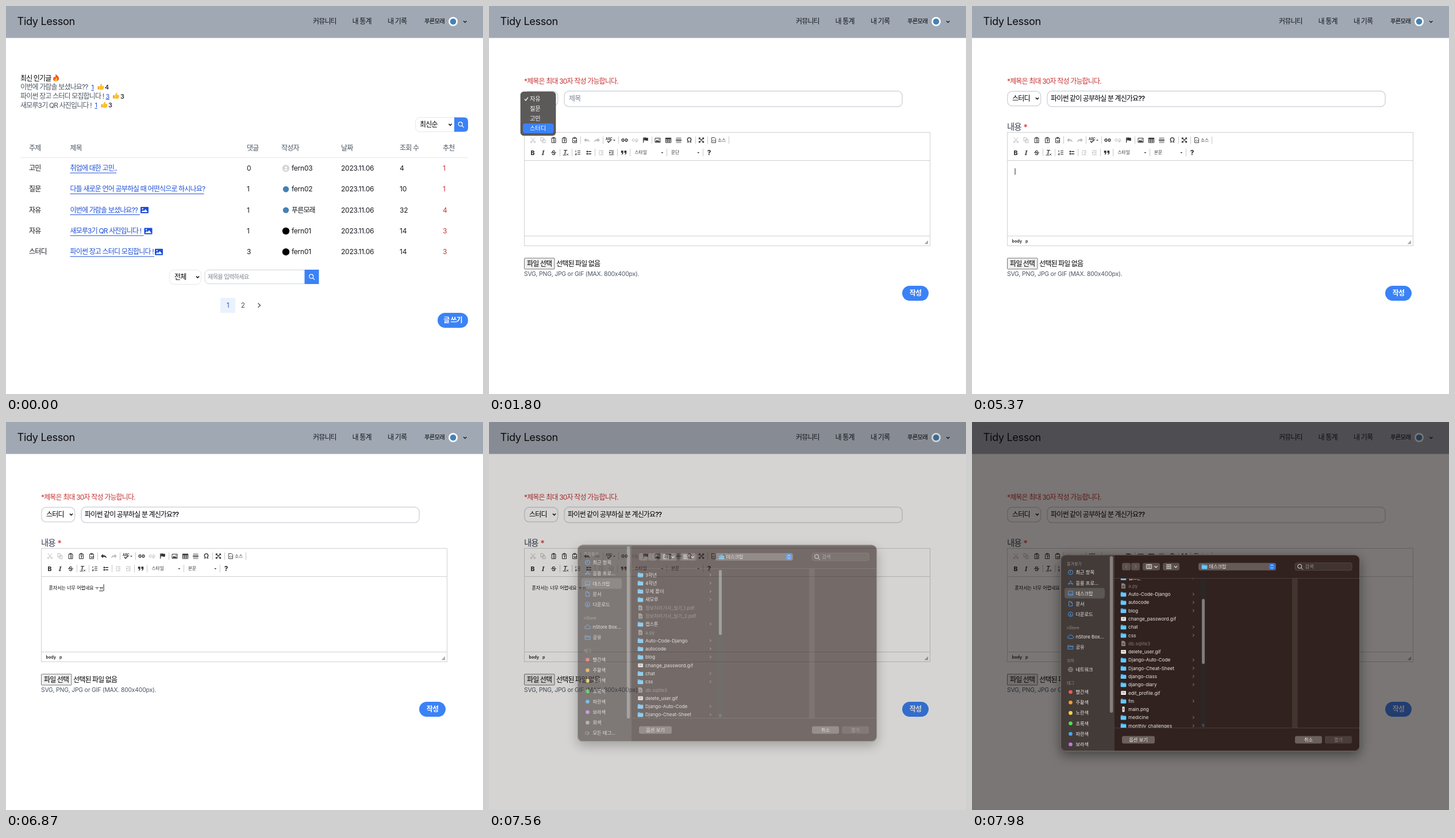
An HTML page that plays this animation: 830x674 px, repeating every 8000 ms.

```html
<!DOCTYPE html>
<html lang="ko">
<head>
<meta charset="utf-8">
<title>Study board</title>
<style>
  html, body { margin: 0; width: 100%; height: 100%; overflow: hidden; background: #fff; }
  svg { display: block; width: 830px; height: 674px; }
  text { font-family: Inter, "Noto Sans CJK KR", "Noto Sans CJK", sans-serif; letter-spacing: -.02em; }
  text.ko { letter-spacing: -.07em; }
  .sys text { letter-spacing: 0; }
  .mid { text-anchor: middle; }
  #dialog { filter: drop-shadow(0 7px 10px rgba(0, 0, 0, .42)); }
</style>
</head>
<body>
<svg id="stage" viewBox="0 0 830 674" xmlns="http://www.w3.org/2000/svg"></svg>
<script>
const BLUE = '#3b82f6', INK = '#16181d', GRAY = '#4b5563', RED = '#c53030', EDGE = '#d1d5db';
const LOOP = 8000;

// ---- drawing helpers; text y is the optical centre of the line ----
const text = (x, y, s, size = 12, fill = INK, attrs = '') =>
  `<text x="${x}" y="${y + size * .37}" font-size="${size}" fill="${fill}" ` +
  `${/class=/.test(attrs) ? '' : /[가-힣]/.test(s) ? 'class="ko"' : ''} ${attrs}>${s}</text>`;
const rect = (x, y, w, h, fill, r = 0, attrs = '') =>
  `<rect x="${x}" y="${y}" width="${w}" height="${h}" rx="${r}" fill="${fill}" ${attrs}/>`;
const box = (x, y, w, h, r, stroke = EDGE, attrs = '') =>
  rect(x, y, w, h, '#fff', r, `stroke="${stroke}" ${attrs}`);
const dot = (x, y, r, fill) => `<circle cx="${x}" cy="${y}" r="${r}" fill="${fill}"/>`;
const line = (x1, y1, x2, y2, color, w = 1) =>
  `<path d="M${x1} ${y1}L${x2} ${y2}" stroke="${color}" stroke-width="${w}"/>`;
const icon = (x, y, d, color = '#333', w = 1, attrs = '') =>
  `<path transform="translate(${x} ${y})" d="${d}" fill="none" stroke="${color}" stroke-width="${w}" ${attrs}/>`;
const solid = (x, y, d, color = '#333', attrs = '') =>
  `<path transform="translate(${x} ${y})" d="${d}" fill="${color}" fill-rule="evenodd" ${attrs}/>`;
const group = (id, body, attrs = '') => `<g id="${id}" ${attrs}>${body}</g>`;
const clip = (id, x, y, w, h, r = 0) => `<clipPath id="${id}">${rect(x, y, w, h, '#000', r)}</clipPath>`;

const down = (x, y, color = '#111', w = 1.5) => icon(x, y, 'M-2.6-1.2L0 1.4L2.6-1.2', color, w);
const right = (x, y, color, k = 1, w = 1) => icon(x, y, `M${-k}${-2 * k}L${k} 0L${-k} ${2 * k}`, color, w);
const lens = (x, y, color = '#fff', w = 1.2) =>
  icon(x, y, 'M2.7-.8a3.5 3.5 0 1 0-7 0a3.5 3.5 0 1 0 7 0M1.7 1.7L5 5', color, w);
const picture = (x, y, color) => solid(x, y,
  'M-7-4.5q0-1 1-1h12q1 0 1 1v9q0 1-1 1h-12q-1 0-1-1zM-5.5 3.5h11l-3.8-5l-2.7 3.2l-1.7-1.5zM-4.5-2.3a1.2 1.2 0 1 0 2.4 0a1.2 1.2 0 1 0-2.4 0z', color);
const thumb = (x, y) =>
  solid(x, y, 'M-2-1L.6-5.5q1.8 0 1.5 1.8L1.6-1.6H4.5q1.4.4 1 1.8L4.5 4q-.5 1-1.6 1H-2z', '#fbc02d') +
  solid(x, y, 'M-5.5-1h3v5.5h-3z', '#f5a623');
const flame = (x, y) =>
  solid(x, y, 'M-1-6.5C4-3.5 5.5-1 5 2.2C4.4 5-1 7-3.6 4.7C-6.2 2-4-.6-3.4-2.4L-2-.6C-.6-2.5-.4-4.5-1-6.5z', '#f4511e') +
  solid(x, y, 'M.5-1.5C3 1 3 5.5 0 5.8C-3 5.5-2.6 2.6-1.6 1.5L-.6 2.4z', '#ffca28');
const pill = (x, y, w, s) =>
  rect(x, y, w, 26, BLUE, 13) + text(x + w / 2, y + 12.7, s, 12, '#fff', 'class="ko mid" font-weight="700"');

// ---- header ----
const header = rect(0, 0, 830, 55.5, '#a0a8b3') + text(19.5, 26.5, 'Tidy Lesson', 18.2, '#0c0d10') +
  text(534, 26.5, '커뮤니티') + text(602.5, 26.5, '내 통계') + text(664, 26.5, '내 기록') +
  text(728, 26.5, '푸른모래', 10.3, '#000', 'font-weight="500"') +
  dot(778, 27, 8, '#fff') + dot(778, 27, 5.3, '#4481b5') + down(798.7, 27.2, '#111', 1.3);

// ---- list page ----
const popular = [
  ['이번에 가람솔 보셨나요??', 1, 148.5, 4], ['파이썬 장고 스터디 모집합니다 !', 3, 173.5, 3], ['새모루3기 QR 사진입니다 !', 1, 154.5, 3]
].map(([s, n, x, likes], i) => {
  const y = 141 + i * 15.6;
  return text(25, y, s, 12, GRAY) + text(x, y, n, 11, '#1d4ed8', 'text-decoration="underline"') +
    thumb(x + (n > 1 ? 18 : 16.5), y - .5) + text(x + (n > 1 ? 25.5 : 23.5), y, likes, 11, INK, 'font-weight="500"');
}).join('');

const columns = [40, 111.5, 419, 479, 583, 685, 760];
const posts = [
  ['고민', '취업에 대한 고민..', 192, 0, 'fern03', 4, 1, '#d4d4d8'],
  ['질문', '다들 새로운 언어 공부하실 때 어떤식으로 하시나요?', 344.5, 1, 'fern02', 10, 1, '#4481b5'],
  ['자유', '이번에 가람솔 보셨나요??', 233, 1, '푸른모래', 32, 4, '#4481b5'],
  ['자유', '새모루3기 QR 사진입니다 !', 239.5, 1, 'fern01', 14, 3, '#000'],
  ['스터디', '파이썬 장고 스터디 모집합니다 !', 258, 3, 'fern01', 14, 3, '#000']
].map(([topic, title, end, replies, author, views, likes, avatar], i) => {
  const y = 281.5 + i * 36.3, [a, b, c, , e, f, g] = columns;
  return text(a, y, topic) + text(b, y, title, 12, '#1d4ed8') + line(b, y + 8.5, end, y + 8.5, '#1d4ed8') +
    (i > 1 ? picture(end + 8, y + .5, '#1d4ed8') : '') + text(c, y, replies) +
    dot(487, y + .5, i == 1 || i == 2 ? 5.2 : 6.2, avatar) +
    (i ? '' : dot(487, y - 1, 2, '#fff') + solid(487, y + .5, 'M-3.4 3.5a3.5 3 0 0 1 6.8 0z', '#fff')) +
    text(497, y, author) + text(e, y, '2023.11.06') + text(f, y, views) + text(g, y, likes, 12, RED);
}).join('');

const listPage = text(25, 125.5, '최신 인기글', 12, '#000', 'font-weight="500"') + flame(87, 125) + popular +
  box(712.5, 193.5, 75, 25, 8, '#e5e7eb') + text(720, 206, '최신순', 12, '#000', 'font-weight="500"') + down(773, 206) +
  solid(780, 193.5, 'M0 0h17q7 0 7 7v11q0 7-7 7h-17z', BLUE) + lens(791.5, 206) +
  ['주제', '제목', '댓글', '작성자', '날짜', '조회 수', '추천'].map((s, i) => text(columns[i], 246.5, s, 12, GRAY)).join('') +
  line(25, 263.5, 804, 263.5, '#e5e7eb') + posts +
  box(284.5, 458.5, 55, 25, 8, '#e5e7eb') + text(293, 470.5, '전체', 12, '#000', 'font-weight="500"') + down(333.5, 470.7) +
  box(346, 458.5, 185, 24, 7) + text(351, 470, '제목을 입력하세요', 10.2, '#7b8290') +
  rect(519.5, 458, 25, 25, BLUE) + lens(532, 470.5) +
  rect(373, 507, 26, 26, '#ebf2fc') + text(386, 520, '1', 12, '#2563c9', 'class="mid"') +
  text(412.3, 520, '2', 12, GRAY, 'class="mid"') + right(440.5, 520, GRAY, 1.9, 1.4) + pill(751, 533, 53, '글 쓰기');

// ---- editor ----
const DARK = '#333', PALE = '#bdbdbd';
const clipboard = 'M-3.5-3.5h7v8h-7zM-1.5-4.8h3v1.8h-3z';
const undo = 'M-5 0L-1-3.7V-1.6C3-1.6 4.7 0 5 3.4C3 1.4 1 1-1 1.3V3.6z';
const redo = 'M5 0L1-3.7V-1.6C-3-1.6-4.7 0-5 3.4C-3 1.4-1 1 1 1.3V3.6z';
const chain = 'M-1-2h-2a2 2 0 0 0 0 4h2M1-2h2a2 2 0 0 1 0 4h-2M-2.5 0h5';
const steps = 'M-4-3.5h8M0-1h4M0 1.2h4M-4 3.7h8';
const caretDown = (x, y) => solid(x, y, 'M-2-1h4l-2 2z');
const seps = (y, ...xs) => xs.map(x => line(x + .5, y - 6.5, x + .5, y + 6.5, '#c8c8c8')).join('');
const glyph = (x, y, s, attrs = '', size = 10.5) => text(x, y, s, size, DARK, `class="mid" ${attrs}`);

const toolbar = seps(233, 159, 198, 225, 283, 359, 380, 417) + seps(254.5, 123, 144, 184, 223, 245, 309, 372) +
  icon(76.5, 233, 'M-3.5-4.5L2 2.3M3.5-4.5L-2 2.3M-1.5 3.2a1.4 1.4 0 1 0-2.8 0a1.4 1.4 0 1 0 2.8 0M4.3 3.2a1.4 1.4 0 1 0-2.8 0a1.4 1.4 0 1 0 2.8 0', PALE) +
  icon(94, 233, 'M-4-4.5h4l1.5 1.5v4.5h-5.5zM-1-1.5h3.5l1.5 1.5v4.5h-5z', PALE) +
  icon(112.5, 233, clipboard + 'M-1-.8h3M-1 1h3M-1 2.8h3') + icon(131, 233, clipboard + 'M-1.5-.5h4M.5-.5v4') +
  icon(149, 233, clipboard + 'M-1.5 0l1 3l1-2l1 2l1-3') +
  solid(170, 233, undo, PALE, 'id="undo"') + solid(188, 233, redo, PALE) +
  glyph(209, 231, 'ABC', 'font-weight="700"', 5.5) + icon(209, 234, 'M-3 .5L-1 3L3.5-1.5', DARK, 1.5) + caretDown(218, 233.5) +
  icon(236, 233, chain, DARK, 1.3) + icon(254, 233, chain + 'M1 1l3 3M4 1l-3 3', PALE) +
  solid(272, 233, 'M-4-4.5h1.2v9h-1.2zM-2.5-4.3q2.5-.9 4 0q2 .8 3.3 0v5q-1.5.9-3.3 0q-1.5-.8-4 0z') +
  icon(293.5, 233, 'M-4.5-3.5h9v7.5h-9z') + solid(293.5, 233, 'M-4 3.3L-1.5-.5L.5 1.5L2 .2L4 3.3zM1.5-2h1.5v1.5h-1.5z') +
  icon(312, 233, 'M-4.7-3.7h9.4v8h-9.4zM-4.5-1h9M-4.5 1.6h9M-1.6-3.5v7.6M1.6-3.5v7.6') + rect(307, 229, 10, 2, DARK) +
  icon(330, 233, 'M-4.5-4h9M-4.5-2h9M-4.5 2.3h9M-4.5 4.3h9', '#777') + line(325, 233.2, 335, 233.2, DARK, 1.5) +
  glyph(348.5, 233, 'Ω', 'font-weight="600"', 11.5) +
  icon(369.5, 233, 'M-4-1.5V-4h2.5M4-1.5V-4H1.5M-4 1.5V4h2.5M4 1.5V4H1.5M-4-4L4 4M4-4L-4 4', DARK, 1.2) +
  icon(391, 233, 'M-3.5-4.5h5l2 2v7h-7zM-.5-.5l-1.3 1.5l1.3 1.5M1-.5l1.3 1.5l-1.3 1.5', DARK, .9) + text(398, 233, '소스', 7.7, DARK) +
  glyph(76, 254.7, 'B', 'font-weight="800"') + glyph(94, 254.7, 'I', 'font-weight="600" font-style="italic" style="font-family:\'Noto Serif\',serif"', 11) +
  glyph(112.5, 254.7, 'S', 'font-weight="600"') + line(108, 254.7, 117, 254.7, DARK) +
  glyph(132.5, 254, 'T', 'font-style="italic" font-weight="600"') + line(128.5, 259, 134, 259, DARK) + icon(136.5, 258, 'M-1.5-1.5l3 3M1.5-1.5l-3 3') +
  icon(155, 254.7, 'M-1-3h5M-1 0h5M-1 3h5M-4-4v3M-4.5 1.5h1.5v1.5h-1.5v1h1.7') +
  icon(173.5, 254.7, 'M-.5-2h5M-.5 2h5', DARK, 1.6) + dot(171, 252.7, 1.5, DARK) + dot(171, 256.7, 1.5, DARK) +
  icon(195, 254.7, steps + 'M-2-1.5l-2 1.6l2 1.6', PALE) + icon(213, 254.7, steps + 'M-4-1.5l2 1.6l-2 1.6M-4 0h3', DARK, 1, 'id="indent"') +
  solid(234.5, 254.7, 'M-4.7-3.5h3.8v3.5q0 3-2.8 3.5v-1.3q1.2-.5 1.2-2h-2.2zM.9-3.5h3.8v3.5q0 3-2.8 3.5v-1.3q1.2-.5 1.2-2h-2.2z') +
  text(253.5, 254.5, '스타일', 7.7, DARK) + caretDown(301.3, 255) + text(317, 254.5, '문단', 7.7, DARK, 'id="format"') + caretDown(364.3, 255) +
  glyph(383, 254.7, '?', 'font-weight="800"', 11.5);

const editor = box(61.5, 219.5, 706, 197, 0, '#d1d1d1') + line(62, 268.5, 767, 268.5, '#d1d1d1') +
  line(62, 399.5, 767, 399.5, '#d1d1d1') + solid(758, 407, 'M6 0v6.5h-6.5z', '#aaa') + group('tools', toolbar, 'class="sys"') +
  group('path', text(69.5, 408, 'body', 7, DARK, 'font-weight="700"') + text(93, 408, 'p', 7, DARK, 'font-weight="700"'), 'class="sys"');

const typing = (id, x, y, size, attrs) => text(x, y, '', size, '#000', `id="${id}" ${attrs}`) +
  rect(x, y + size * .6, 0, 1, '#222', 0, `id="${id}Line"`) + rect(x, y - 6, 1, size > 10 ? 12 : 11, '#222', 0, `id="${id}Caret"`);

const menu = rect(55, 149, 61, 76, '#5c5959', 5.5, 'stroke="#444" stroke-width=".6"') +
  rect(59, 153, 53.5, 17, BLUE, 4, 'id="pick"') + icon(65, 161.5, 'M-3 .2L-1 2.6L3-2.8', '#fff', 1.3) +
  ['자유', '질문', '고민', '스터디'].map((s, i) => text(71, 161 + i * 17, s, 10.2, '#fff')).join('');

const writePage = text(61, 130.5, '*제목은 최대 30자 작성 가능합니다.', 12, RED) +
  box(61.7, 148.2, 58, 25.3, 8, EDGE, 'stroke-width="1.4"') +
  text(70, 160.5, '자유', 12, '#000', 'id="category" class="ko" font-weight="500"') + down(113.5, 160.5) +
  box(131, 147.8, 588, 27, 8, EDGE, 'stroke-width="1.4" id="field"') + text(139, 160.5, '제목', 12, '#7b8290', 'id="hint" class="ko"') +
  typing('title', 137, 160.5, 12, 'class="ko" font-weight="500"') +
  text(61, 209.5, '내용', 14.5, '#374151') + text(89.5, 211, '*', 14.5, '#dc2626') +
  group('editor', editor) + group('bodyText', typing('body', 74.5, 288, 8, ''), 'class="sys"') +
  rect(61.5, 438, 52.5, 19, '#efefef', 1, 'stroke="#767676" id="choose"') + text(66, 447.3, '파일 선택', 12, '#000', 'font-weight="500"') +
  text(117, 447.3, '선택된 파일 없음', 12, '#000', 'font-weight="500"') +
  text(61, 465.5, 'SVG, PNG, JPG or GIF (MAX. 800x400px).', 10.4, GRAY) + pill(719, 486, 46, '작성') + group('menu', menu, 'class="sys"');

// ---- file dialog ----
const SKY = '#4a9df0', LABEL = '#ece8e6', FAINT = '#958d89';
const side = (y, s, d) => (s === '데스크탑' ? rect(161, y - 9.2, 70, 18.3, '#5d5754', 4) : '') + icon(171.5, y, d, SKY, .9) + text(180.5, y, s, 8.2, LABEL);
const heading = (y, s) => text(165, y, s, 7, FAINT);
const ring = 'M4 0a4 4 0 1 0-8 0a4 4 0 1 0 8 0';
const tags = [['빨간색', '#ee5a56'], ['주황색', '#f2a024'], ['노란색', '#fcd43c'], ['초록색', '#4fdf52'],
  ['파란색', '#47a8f8'], ['보라색', '#c673ea'], ['회색', '#a19c99']];
const sidebar = heading(246, '즐겨찾기') + side(261, '최근 항목', ring + 'M0-2.5V0h-2') +
  side(279.5, '응용 프로…', 'M-3.5 3.5L0-4L3.5 3.5M-4.5 1.2h9') + side(297.5, '데스크탑', 'M-4-3.5h8v7h-8zM-4 1.7h8') +
  side(315.7, '문서', 'M-3-4h3.5l2.5 2.5v5.5h-6zM.5-4v2.5h2.5') + side(334, '다운로드', ring + 'M0-2v4M-1.7.5L0 2.2L1.7.5') +
  heading(357.5, 'nStore') + side(373, 'nStore Box...', 'M-3 3a2 2 0 0 1 0-4a3.2 3.2 0 0 1 6-.5a2.2 2.2 0 0 1 0 4.5z') +
  side(391, '공유', 'M-4.5-3h3l1 1h5v5.5h-9zM-4.5-.5h9') +
  group('network', heading(414.7, '위치') + icon(171.5, 430, ring + 'M-4 0h8M0-4q-3.5 4 0 8q3.5-4 0-8', '#a09894', .8) + text(180.5, 430, '네트워크', 8.2, LABEL)) +
  group('tags', heading(453.7, '태그') + tags.map(([s, c], i) => dot(171.5, 469 + i * 18.2, 3.3, c) + text(180.5, 469 + i * 18.2, s, 8.2, LABEL)).join('') +
    icon(171.5, 596.4, 'M1 0a2.5 2.5 0 1 0-5 0a2.5 2.5 0 1 0 5 0M0-2.5a2.5 2.5 0 0 1 0 5', FAINT, .8) + text(180.5, 596.4, '모든 태그…', 8.2, LABEL));

const folder = (x, y) => solid(x, y, 'M-4.7-3.2q0-.8.8-.8h2.6l1 1h4.2q.8 0 .8.8v5.4q0 .8-.8.8h-7.8q-.8 0-.8-.8z', '#40aef0') +
  rect(x - 4.7, y - 1.8, 9.4, 5.8, '#68c8fb', .8);
const files = ('3학년,4학년,무제 폴더,새모루,정보처리기사_실기_1.pdf,정보처리기사_실기_2.pdf,캡스톤,a.py,Auto-Code-Django,autocode,blog,' +
  'change_password.gif,chat,css,db.sqlite3,delete_user.gif,Django-Auto-Code,Django-Cheat-Sheet,django-class,django-diary,' +
  'edit_profile.gif,fm,main.png,medicine,monthly_challenges,movie,notes').split(',').map((name, i) => {
  const y = 282.5 + i * 14.28, dim = /pdf|py$|sqlite/.test(name), image = /gif|png/.test(name);
  const mark = dim ? solid(263.5, y, 'M-3.5-4.5h4.5l2.5 2.5v6.5h-7zM-2-.5v.8h4v-.8zM-2 1.5v.8h4v-.8z', '#8b827e')
    : name === 'main.png' ? rect(261.5, y - 4.5, 4, 9, '#f4f2f1') + rect(263, y - 2, 1, 4, '#555')
    : image ? rect(259.3, y - 3.2, 8.6, 6.6, '#f4f2f1', .6) + rect(261.5, y - 1.5, 4.3, 2.5, '#a8a6a5') : folder(263.5, y);
  return mark + text(272, y, name, 8.2, dim ? '#81776f' : LABEL) + (dim || image ? '' : right(385.3, y, '#a39b97', 1.1, .9));
}).join('');

const key = (x, w, s, fill, color) => rect(x, 545.5, w, 13, fill, 3) + text(x + w / 2, 551.8, s, 8.2, color, 'class="mid"');
const CTRL = '#5c504c';
const dialog = rect(154, 230.5, 521, 341.5, '#31221f', 9) +
  `<g clip-path="url(#frame)">${rect(154, 230, 94, 343, '#433b38')}${sidebar}` +
  rect(239.8, 233, 5.6, 272, '#85807d', 2.8, 'id="sideThumb"') + '</g>' +
  line(248, 271.5, 675, 271.5, '#4a3d39') + line(248, 531.5, 675, 531.5, '#4a3d39') +
  rect(397, 272, 11, 259, '#2c2624') + rect(557, 272, 9.5, 259, '#42342f') +
  `<g clip-path="url(#rows)">${group('files', files)}</g>` + rect(400, 274, 5, 113, '#827b78', 2.5, 'id="fileThumb"') +
  line(401.3, 524.5, 401.3, 529.5, '#8b827e', .7) + line(403.3, 524.5, 403.3, 529.5, '#8b827e', .7) +
  rect(261, 244.7, 15, 13, CTRL, 3) + rect(277, 244.7, 15, 13, CTRL, 3) +
  icon(268.5, 251.2, 'M1.3-3L-1.5 0L1.3 3', '#8f8581') + icon(284.5, 251.2, 'M-1.3-3L1.5 0L-1.3 3', '#8f8581') +
  rect(297, 244.7, 30, 13, CTRL, 3) + icon(308, 251.2, 'M-4.5-3.5h9v7h-9zM-1.5-3.5v7M1.5-3.5v7', LABEL) + down(320, 251.4, LABEL, 1.2) +
  rect(332, 244.7, 29, 13, CTRL, 3) + icon(342.5, 251.2, 'M-4-3h8M-4 0h8M-4 3h8', LABEL, 2, 'stroke-dasharray="2 1"') + down(354.5, 251.4, LABEL, 1.2) +
  rect(394, 244.7, 135, 13, '#665a56', 3.5) + folder(404.5, 251.2) + text(412.5, 251, '데스크탑', 8.2, LABEL) +
  rect(517, 246, 10, 10.5, '#2f7cf0', 2.5) + icon(522, 251.2, 'M-2-1.2L0-3.2L2-1.2M-2 1.2L0 3.2L2 1.2', '#fff') +
  rect(562, 244.7, 99, 13, '#403330', 3, 'stroke="#5a4c48" stroke-width=".8"') + lens(571, 251.5, LABEL, 1) + text(579.5, 251, '검색', 8.2, '#9a908c') +
  key(261, 57, '옵션 보기', '#6b605c', LABEL) + key(562, 47, '취소', '#6b605c', LABEL) + key(614, 47, '열기', '#4a3d39', '#8d837f') +
  rect(154.4, 230.9, 520.2, 340.7, 'none', 9, 'stroke="#8b827e" stroke-width=".8"');

document.getElementById('stage').innerHTML =
  `<defs>${clip('frame', 154, 230.5, 521, 341.5, 9)}${clip('rows', 248, 272, 148, 259)}</defs>` +
  rect(0, 0, 830, 674, '#fff') + header + group('list', listPage) + group('write', writePage) +
  rect(0, 0, 830, 674, '#0c0705', 0, 'id="shade"') + group('dialog', dialog, 'class="sys"');

// ---- Hangul typing: one picture per key press ----
const LEADS = 'ㄱㄲㄴㄷㄸㄹㅁㅂㅃㅅㅆㅇㅈㅉㅊㅋㅌㅍㅎ';
function strokes(ch) {
  const code = ch.charCodeAt(0) - 0xac00;
  if (code < 0 || code > 11171) return [ch];
  const tail = code % 28, parts = [LEADS[code / 588 | 0], String.fromCharCode(0xac00 + code - tail)];
  return tail ? [...parts, ch] : parts;
}
function typed(runs, t) {
  let done = '', shown = '';
  for (const [words, start, end] of runs) {
    if (t < start) break;
    const keys = [];
    for (const ch of words) {
      for (const part of strokes(ch)) keys.push(done + part);
      done += ch;
    }
    const n = Math.floor((t - start) / (end - start) * (keys.length - 1) + 1e-6);
    shown = keys[Math.min(n, keys.length - 1)];
  }
  return shown;
}
const titleRuns = [['파이썬', 2460, 3210], [' 같이 공부하실', 3270, 3950], [' 분 ', 3990, 4170], ['계신가요??', 4380, 4920]];
const bodyRuns = [['혼자서는 너무 어', 5550, 6270], ['렵네요 ㅜㅠ', 6360, 6870]];

// ---- timeline ----
const $ = id => document.getElementById(id);
const set = (id, name, value) => $(id).setAttribute(name, value);
const show = (id, on) => { $(id).style.display = on ? '' : 'none'; };
const ramp = (t, a, b) => Math.min(1, Math.max(0, (t - a) / (b - a)));

function setTyping(id, x, value, caret, focused) {
  const node = $(id), shown = value.replace(/ /g, '\u00a0');
  if (node.textContent !== shown) node.textContent = shown;
  const n = shown.length, width = n ? node.getComputedTextLength() : 0;
  const before = n > 1 ? node.getSubStringLength(0, n - 1) : 0;
  set(id + 'Caret', 'x', x + width);
  set(id + 'Line', 'x', x + before);
  set(id + 'Line', 'width', width - before);
  show(id + 'Caret', caret);
  show(id + 'Line', focused && /[ㄱ-힣]$/.test(value));
}

function draw(t) {
  show('list', t < 600);
  show('write', t >= 600);
  show('editor', t >= 700);

  show('menu', t >= 1350 && t < 2220);
  set('menu', 'opacity', 1 - ramp(t, 2040, 2220));
  set('pick', 'y', 153 + 17 * ((t >= 1560) + (t >= 1650) + (t >= 1800)));
  show('pick', t < 1980 || t >= 2020);
  $('category').textContent = t < 2040 ? '자유' : '스터디';

  const title = typed(titleRuns, t), titleFocus = t >= 2280 && t < 5160;
  set('field', 'stroke', titleFocus ? '#1c57b5' : EDGE);
  show('hint', !title);
  setTyping('title', 137, title, titleFocus, titleFocus);

  const inBody = t >= 5220, body = typed(bodyRuns, t);
  setTyping('body', 74.5, body, inBody && t < 7080, inBody && t < 7290);
  show('path', inBody);
  $('format').textContent = inBody ? '본문' : '문단';
  set('indent', 'stroke', inBody ? PALE : DARK);
  set('undo', 'fill', body ? DARK : PALE);
  set('choose', 'fill', t >= 7290 && t < 7410 ? '#f5f5f5' : '#efefef');

  const open = ramp(t, 7470, 7760);
  set('shade', 'opacity', .55 * open);
  show('dialog', open > 0);
  set('dialog', 'opacity', ramp(t, 7470, 7625));
  set('dialog', 'transform', `translate(0 ${-36 * (1 - open) ** 2})`);

  const located = t >= 7740, scroll = 97.6 * ramp(t, 7780, 7980) ** 1.3;
  show('network', located);
  set('tags', 'transform', `translate(0 ${located ? 0 : -39})`);
  set('sideThumb', 'height', located ? 272 : 299);
  set('files', 'transform', `translate(0 ${-scroll})`);
  set('fileThumb', 'y', 274 + scroll * .34);
}

const begin = performance.now();
function tick() {
  draw((performance.now() - begin) % LOOP);
  requestAnimationFrame(tick);
}
tick();
</script>
</body>
</html>
```
